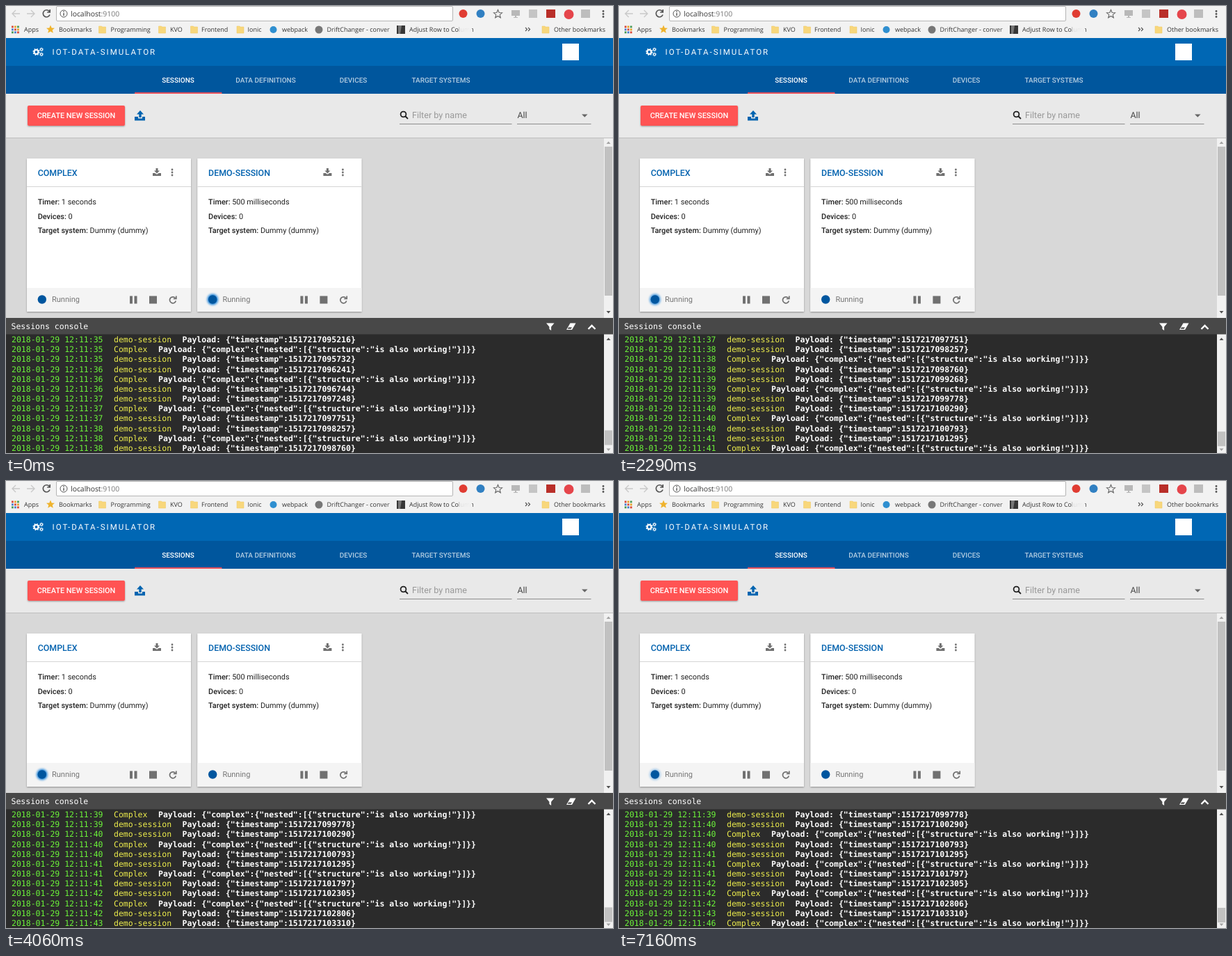
Animation, 873 px wide and 642 px high, one loop 7310 ms. Source, as an HTML page:

```html
<!DOCTYPE html>
<html lang="en">
<head>
<meta charset="utf-8">
<title>Session console</title>
<style>
html, body { margin: 0; width: 100%; height: 100%; overflow: hidden; background: #d8d8d8; }
svg { display: block; font-family: Roboto, sans-serif; text-rendering: geometricPrecision; }
.chrome { font: 9px "Open Sans", sans-serif; fill: #333; }
.tab { font-size: 10px; font-weight: 500; text-anchor: middle; fill: #b3cde2; }
.title { font-size: 12.4px; font-weight: 500; fill: #0061ae; }
.info { font-size: 10.9px; fill: #222; }
.info tspan { font-weight: 500; }
.mono { font: 11.5px "DejaVu Sans Mono", monospace; fill: #fff; }
.date { fill: #6cf43a; }
.name { fill: #eded4c; }
.body { font-weight: bold; }
</style>
</head>
<body>
<svg width="873" height="642" viewBox="0 0 873 642">
  <defs>
    <filter id="blur" x="-60%" y="-60%" width="220%" height="220%"><feGaussianBlur stdDeviation="1.7"/></filter>
    <filter id="shadow" x="-10%" y="-10%" width="120%" height="130%">
      <feDropShadow dx="0" dy="1" stdDeviation="1.2" flood-opacity=".35"/>
    </filter>
    <linearGradient id="fade"><stop offset="0" stop-color="#f2f2f2" stop-opacity="0"/><stop offset="1" stop-color="#f2f2f2"/></linearGradient>
    <path id="folder" d="M0 1h4l1 1h5v9h-10z" fill="#f8d77c" stroke="#edc65f" stroke-width=".5"/>
    <path id="star" d="M0-6 1.7-2 6-1.7 2.7 1.1 3.8 5.3 0 3-3.8 5.3-2.7 1.1-6-1.7-1.7-2z"/>
    <g id="tray"><path d="M-6 2h3.5l1.5 1.5h2L2.500 2H6v4H-6z"/></g>
    <g id="kebab"><circle cy="-4" r="1.4"/><circle r="1.4"/><circle cy="4" r="1.4"/></g>
    <g id="gear" fill="none" stroke="#fff">
      <circle r="2.9" stroke-width="2"/><circle r="4.4" stroke-width="1.4" stroke-dasharray="1.73"/>
    </g>
  </defs>

  <!-- browser bars -->
  <path fill="#f2f2f2" d="M0 0h873v46H0z"/>
  <rect x="72.500" y=".5" width="570" height="21" rx="1.500" fill="#fff" stroke="#b5b5b5"/>
  <g fill="none" stroke-width="1.400">
    <path stroke="#c9c9c9" d="M20 11H9m5-5-5 5 5 5M30 11h11m-5-5 5 5-5 5"/>
    <path stroke="#555" stroke-width="1.700" d="M62.500 8A5 5 0 1 0 63 12.500M63.200 5v4h-4"/>
    <circle cx="83" cy="11" r="5" stroke="#555" stroke-width="1"/>
    <path stroke="#555" d="M83 10v4M83 7.500v1.400"/>
    <use href="#star" x="707.500" y="11.500" stroke="#666" stroke-width="1.100"/>
  </g>
  <text x="93" y="15" class="chrome" style="font-size:10.4px">localhost<tspan fill="#777">:9100</tspan></text>
  <circle cx="657.500" cy="11" r="6" fill="#e03c32"/>
  <circle cx="682.500" cy="11" r="6" fill="#3180c2"/>
  <path fill="#b8b8b8" d="M727 6h12v8h-5v2h2v1h-6v-1h2v-2h-5z"/>
  <path fill="#c5c5c5" d="M752 5h12v12h-12z"/>
  <path fill="#b92f29" d="M777 5h13v12h-13z"/>
  <circle cx="809.500" cy="12" r="7" fill="#e5454b"/>
  <path fill="#bdbdbd" d="M827 5h13v12h-13z"/>
  <use href="#kebab" x="859" y="11.500" fill="#555"/>
  <g id="apps"></g>
  <use href="#star" x="64" y="33.500" fill="#efb32d"/>
  <g id="folders"></g>
  <circle cx="384.500" cy="34" r="5" fill="#2f8fd0"/>
  <circle cx="450" cy="34" r="5.500" fill="#777"/>
  <path fill="#373737" d="M562 28h12v12h-12z"/><path fill="#777" d="M564 28h5l-2 12h-3z"/>
  <g id="marks" class="chrome"></g>
  <path fill="url(#fade)" d="M535 26h17v16h-17zM652 26h18v16h-18z"/>
  <path fill="#f2f2f2" d="M552 26h9v16h-9z"/>
  <path fill="none" stroke="#555" stroke-width="1.200" d="m747 31 2.500 2.500-2.500 2.500m4-5 2.500 2.500-2.500 2.500"/>

  <!-- application header -->
  <path fill="#0067b4" d="M0 46h873v41H0z"/>
  <path fill="#00569d" d="M0 86h873v40H0z"/>
  <path fill="#e8505b" d="M185 124h125.500v2H185z"/>
  <use href="#gear" x="43.500" y="66"/>
  <use href="#gear" transform="translate(51 62.500) scale(.55)"/>
  <use href="#gear" transform="translate(51 69.500) scale(.55)"/>
  <text x="66.500" y="70" fill="#fff" font-size="11.500" letter-spacing="2.030">IOT-DATA-SIMULATOR</text>
  <path fill="#fff" d="M800 54h24v24h-24z"/>
  <text x="247.500" y="110" class="tab" style="fill:#fff">SESSIONS</text>
  <text x="373.500" y="110" class="tab">DATA DEFINITIONS</text>
  <text x="499.500" y="110" class="tab">DEVICES</text>
  <text x="625.500" y="110" class="tab">TARGET SYSTEMS</text>

  <!-- tools -->
  <path fill="#e9e9e9" d="M0 126h873v63H0z"/>
  <path fill="#d8d8d8" d="M0 189h873v259H0z"/>
  <path fill="#bfbfbf" d="M0 189h873v1H0z"/>
  <rect x="31" y="143" width="140" height="29" rx="2" fill="#ff5252" filter="url(#shadow)"/>
  <text x="101" y="161" fill="#fff" font-size="10.900" font-weight="500" text-anchor="middle">CREATE NEW SESSION</text>
  <path fill="#0064b0" d="m193 150 5 5.500h-3.300v4.500h-3.400v-4.500H188zM185 159h5v2.500h6V159h4v5.500h-15z"/>
  <g fill="none" stroke="#222" stroke-width="1.800"><circle cx="571.500" cy="155.500" r="3.900"/><path d="m574.500 158.500 3.500 3.500"/></g>
  <text x="584" y="161" font-size="12.600" fill="#989898">Filter by name</text>
  <text x="735.500" y="161" font-size="12.400" fill="#444">All</text>
  <path fill="#8d8d8d" d="M566 169h161.500v1H566zM735 169h106.500v1H735z"/>
  <path fill="#666" d="M828 155.500h8.500l-4.250 4.300z"/>

  <g id="cards"></g>

  <!-- page scrollbar -->
  <path fill="#f1f1f1" d="M860 190h13v258h-13z"/>
  <path fill="#c1c1c1" d="M861 202h11v214h-11z"/>
  <path fill="#a3a3a3" d="m863.500 198 3-3.500 3 3.500z"/>
  <path fill="#505050" d="m863.500 438 3 3.500 3-3.500z"/>

  <!-- console -->
  <path fill="#2b2b2b" d="M0 471h873v171H0z"/>
  <g id="log" class="mono"></g>
  <path fill="#484848" d="M0 448h873v23.500H0z"/>
  <text x="7.500" y="464" class="mono">Sessions console</text>
  <g fill="#fff">
    <path d="M777 455.500h11.500l-4.400 5.200v5.300l-2.700-2v-3.300z"/>
    <path d="M811.500 455.500h8l-5.500 9.500h-8z"/>
    <path fill="#484848" d="m809 461.500 5 0-1.500 2.300h-4.800z"/>
    <path fill="none" stroke="#fff" stroke-width="2.400" d="m837.500 464 5-5 5 5"/>
  </g>
  <path fill="#f1f1f1" d="M860 471.500h13V642h-13z"/>
  <rect id="thumb" x="861" width="11" height="21" fill="#c1c1c1"/>
  <path fill="#505050" d="m863.500 480 3-3.500 3 3.500z"/>
  <path fill="#a3a3a3" d="m863.500 635.500 3 3.500 3-3.500z"/>
</svg>
<script>
const LOOP = 7310, PITCH = 14.18;
const $ = id => document.getElementById(id);

const hues = ['#d94b3d', '#e8a52c', '#4a9c58', '#4a7fd0'];
$('apps').innerHTML = Array.from({length: 9}, (_, i) =>
  `<rect x="${8 + i % 3 * 4}" y="${28.5 + (i / 3 | 0) * 4}" width="2.8" height="2.8" fill="${hues[i % 4]}"/>`).join('');
$('folders').innerHTML = [133.5, 219.5, 265.5, 332, 771].map(x => `<use href="#folder" x="${x}" y="28"/>`).join('');
$('marks').innerHTML = [
  [26, 'Apps'], [76, 'Bookmarks'], [150.5, 'Programming'], [236, 'KVO'], [281, 'Frontend'], [347.5, 'Ionic'],
  [397, 'webpack'], [461.5, 'DriftChanger - conver'], [580, 'Adjust Row to Column'], [788, 'Other bookmarks']
].map(([x, s]) => `<text x="${x}" y="37">${s}</text>`).join('');

const card = (x, title, timer, glow) => `<g transform="translate(${x})">
  <path fill="#fff" filter="url(#shadow)" d="M0 219h236v220H0z"/>
  <path fill="#f4f4f4" d="M0 405h236v34H0z"/><path fill="#d5d5d5" d="M0 259h236v1H0z"/>
  <text x="15.700" y="244" class="title">${title}</text>
  <g fill="#707070">
    <use href="#tray" x="187" y="238"/><path d="M185.500 233h3v3.500h2.500l-4 4-4-4h2.500z"/>
    <use href="#kebab" x="209" y="239"/>
    <path d="M148 416.500h4v11h-4zM154.500 416.500h4v11h-4zM176 416.500h11v11h-11z"/>
    <path fill="none" stroke="#707070" stroke-width="1.700" d="M213.500 419.500a4.500 4.500 0 1 0 .8 4M214.800 416.500v4h-4"/>
  </g>
  <g class="info">
    <text x="15.700" y="285"><tspan>Timer:</tspan> ${timer}</text>
    <text x="15.700" y="305.500"><tspan>Devices:</tspan> 0</text>
    <text x="15.700" y="326"><tspan>Target system:</tspan> Dummy (dummy)</text>
  </g>
  <circle id="${glow}" cx="21.800" cy="421.500" r="8" fill="#1580d8" filter="url(#blur)"/>
  <circle cx="21.800" cy="421.500" r="6.200" fill="#00569f"/>
  <text x="36" y="425" font-size="11" fill="#757575">Running</text></g>`;
$('cards').innerHTML = card(30, 'COMPLEX', '1 seconds', 'glowA') + card(275.4, 'DEMO-SESSION', '500 milliseconds', 'glowB');

// Log stamps, in ms after 1517217000000; later ones follow every 503 ms
const stamps = [95216, 95732, 96241, 96744, 97248, 97751, 98257, 98760, 99268, 99778,
  100290, 100793, 101295, 101797, 102305, 102806, 103310, 103818, 104323];
const stamp = n => 1517217000000 + (stamps[n] ?? stamps[18] + (n - 18) * 503);

function line(i, y) {
  const nested = i % 3 === 1;
  const data = nested ? '{"complex":{"nested":[{"structure":"is also working!"}]}}'
    : `{"timestamp":${stamp(i - Math.floor((i + 1) / 3))}}`;
  return `<text x="8" y="${y}" class="date">2018-01-29 12:11:${35 + Math.floor(i / 3)}` +
    `<tspan x="155" class="name">${nested ? 'Complex' : 'demo-session'}</tspan>` +
    `<tspan dx="15.5" class="body" fill="#fff">Payload: ${data}</tspan></text>`;
}

// Each span scrolls one line, in one to three hard steps
const spans = [[70, 70], [170, 250], [650, 730], [950, 1050], [1200, 1350], [1650, 1810], [1900, 2060],
  [2210, 2290], [2650, 2750], [2900, 3060], [3200, 3300], [3600, 3750], [3900, 4060], [4210, 4290],
  [4440, 4520], [4910, 5050], [5220, 5220], [5450, 5450], [5760, 5760], [6230, 6230], [6620, 6620],
  [6930, 6930], [7160, 7160]];
const scrollKeys = [[0, 0]];
spans.forEach(([from, to], n) => {
  const parts = from === to ? [1] : to - from < 140 ? [.436, 1] : [.3, .75, 1];
  parts.forEach((p, k) => scrollKeys.push([from + (to - from) * k / Math.max(1, parts.length - 1), n + p]));
});
const glowKeys = [[0, 0], [170, .55], [1980, .75], [3980, .9], [4910, .4], [5760, .7], [5850, .9], [5930, .75], [6620, .4]];
const at = (keys, t) => keys.findLast(k => k[0] <= t)[1];

let shown = -1;
function draw(now) {
  const t = now % LOOP, pos = at(scrollKeys, t), top = Math.floor(pos);
  $('glowA').setAttribute('opacity', at(glowKeys, t));
  $('glowB').setAttribute('opacity', t < 70 ? .9 : 0);
  if (pos !== shown) {
    shown = pos;
    // Once the log is full, the rows above the newest lag nine lines behind
    const lag = pos > 16 ? 9 : 0;
    $('log').innerHTML = Array.from({length: 13}, (_, j) =>
      line(top + j - (j < 11 ? lag : 0), 483 + (j + top - pos) * PITCH)).join('');
    $('thumb').setAttribute('y', 609.5 + Math.min(pos, 16) * .22);
  }
  requestAnimationFrame(draw);
}
const start = performance.now();
const tick = draw;
draw = now => tick(Math.max(0, now - start));
draw(start);
</script>
</body>
</html>
```
